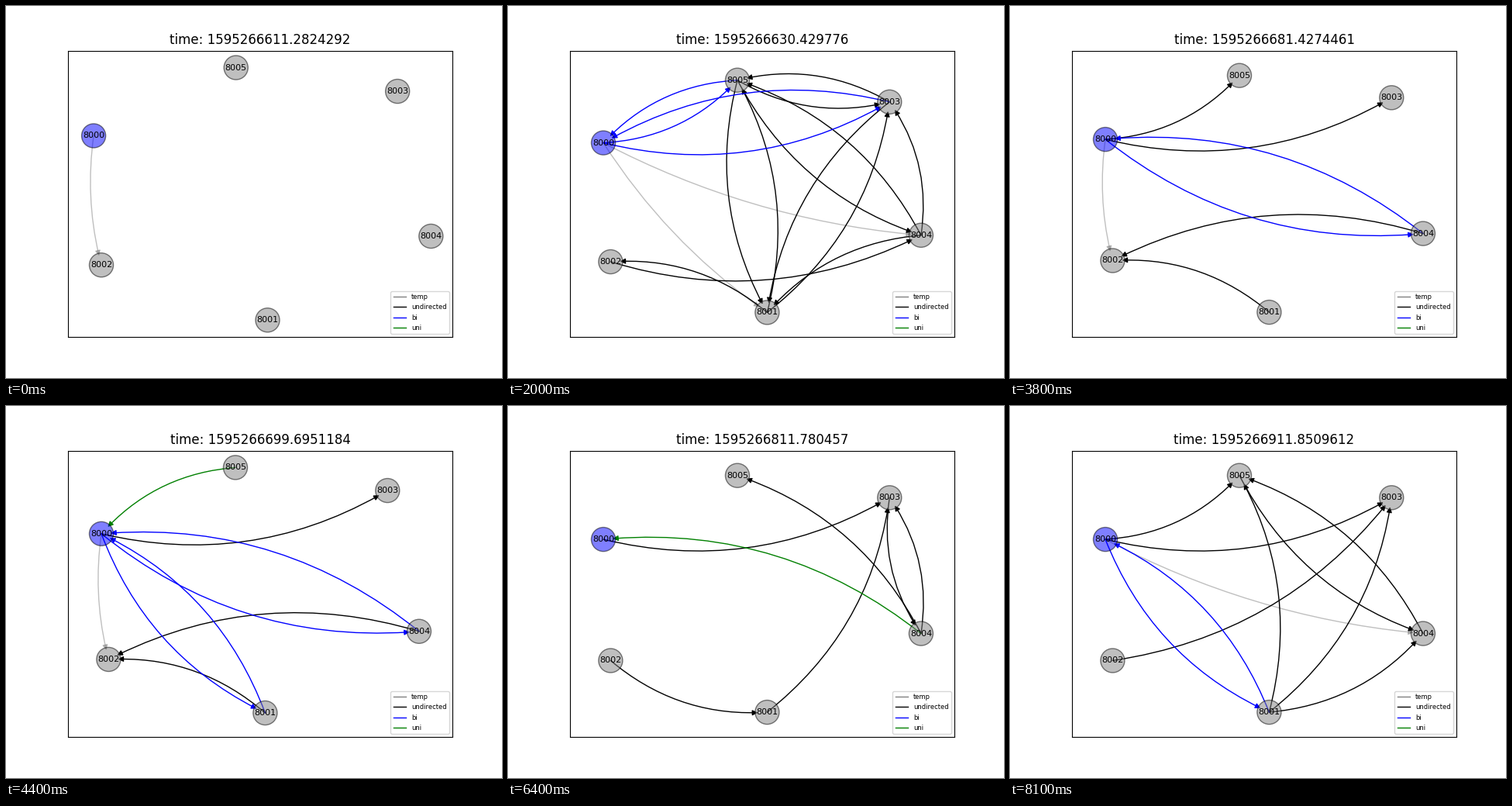
Animation, 640 px wide and 480 px high, one loop 8.2 s. Source, as a matplotlib script:

```python
import math
import random

import matplotlib.pyplot as plt
import numpy as np
from matplotlib.animation import FuncAnimation
from matplotlib.lines import Line2D
from matplotlib.patches import FancyArrowPatch

FRAMES, INTERVAL = 82, 100
NODE_SIZE, TIP_GAP = 500, math.sqrt(300) / 2
MARKER_PAD = 4.8   # room the markers take beyond the outer nodes
SKEW = 1.008       # aspect correction for the curve control points

NODES = np.array([(123.04, 307.9), (334.4, 84.87), (132.4, 151.5),
                  (492.3, 361.7), (532.96, 186.4), (296.0, 390.33)])

# kind: (colour, curvature, alpha)
KINDS = {
    "temp": ("grey", 0.1, 0.5),
    "undirected": ("black", 0.2, None),
    "bi": ("blue", 0.2, None),
    "uni": ("green", 0.2, None),
}

# frame: (clock, links by kind); "05" is a link from node 0 to node 5
STATES = {
    0: (1595266611.2824292, {"temp": "02"}),
    20: (1595266630.429776, {"undirected": "35 53 51 15 54 45 31 13 43 41 12 24",
                             "bi": "50 05 30 03", "temp": "04 01"}),
    30: (1595266657.07055, {"undirected": "05 03 51 15 54 31 13 12 24"}),
    44: (1595266699.6951184, {"undirected": "03 42 12", "bi": "04 40 01 10",
                              "uni": "50", "temp": "02"}),
    56: (1595266762.0957768, {"undirected": "05 03 04 21"}),
    72: (1595266861.4651375, {"undirected": "45 34 43 13 14", "bi": "30 03",
                              "uni": "40"}),
    81: (1595266911.8509612, {"undirected": "05 03 23 15 13 14 54 45",
                              "bi": "01 10", "temp": "04"}),
}
KEYS = list(STATES)
CLOCKS = [STATES[k][0] for k in KEYS]


def pair_of(link):
    return "".join(sorted(link))


def links_at_key(key):
    return {link: kind for kind, text in STATES[key][1].items()
            for link in text.split()}


def links_at(frame):
    """Links between two states: each node pair switches at its own moment."""
    if frame in STATES:
        return links_at_key(frame)
    start = max(k for k in KEYS if k < frame)
    end = min(k for k in KEYS if k > frame)
    old, new = links_at_key(start), links_at_key(end)
    rng = random.Random(start)
    pairs = sorted({pair_of(link) for link in [*old, *new]})
    switch = {p: rng.randint(start + 1, min(end, start + 10)) for p in pairs}
    links = {l: k for l, k in old.items() if frame < switch[pair_of(l)]}
    links.update({l: k for l, k in new.items() if frame >= switch[pair_of(l)]})
    return links


def ends(link):
    return NODES[int(link[0])], NODES[int(link[1])]


def control_point(link, rad):
    a, b = ends(link)
    dx, dy = b - a
    control = (a + b) / 2 + rad * np.array([dy / SKEW, -dx * SKEW])
    return a + (1 - 13 / math.hypot(dx, dy)) * (control - a)


def view_limits(links):
    points = [NODES.min(axis=0) - MARKER_PAD, NODES.max(axis=0) + MARKER_PAD]
    for kind, (_, rad, _) in KINDS.items():
        group = [link for link in links if links[link] == kind]
        if not group:
            continue
        tips = np.array([p for link in group for p in ends(link)])
        low, high = tips.min(axis=0), tips.max(axis=0)
        pad = 0.05 * (high - low)
        points += [low - pad, high + pad]
        points += [control_point(link, rad) for link in group]
    low, high = np.min(points, axis=0), np.max(points, axis=0)
    margin = 0.05 * (high - low)
    return low - margin, high + margin


fig, ax = plt.subplots(figsize=(6.4, 4.8), dpi=100)
fig.subplots_adjust(left=0.125, right=0.9, bottom=0.11, top=0.88)


def draw(frame):
    ax.clear()
    links = links_at(frame)
    low, high = view_limits(links)
    ax.set(xlim=(low[0], high[0]), ylim=(low[1], high[1]), xticks=[], yticks=[])

    for kind, (color, rad, alpha) in KINDS.items():
        for link in links:
            if links[link] == kind:
                a, b = ends(link)
                ax.add_patch(FancyArrowPatch(
                    a, b, arrowstyle="-|>", mutation_scale=10, color=color,
                    alpha=alpha, lw=1, shrinkA=0, shrinkB=TIP_GAP,
                    connectionstyle=f"arc3,rad={rad}", zorder=1))

    ax.scatter(*NODES.T, s=NODE_SIZE, c=["blue"] + ["grey"] * 5, alpha=0.5,
               edgecolors="black", linewidths=1, zorder=2)
    for i, (x, y) in enumerate(NODES):
        ax.text(x, y, str(8000 + i), size=8, ha="center", va="center")

    ax.set_xlim(low[0], high[0])
    ax.set_ylim(low[1], high[1])
    handles = [Line2D([], [], color=c, lw=1, label=kind)
               for kind, (c, _, _) in KINDS.items()]
    ax.legend(handles=handles, loc="lower right", prop={"size": 6})
    ax.set_title(f"time: {float(np.interp(frame, KEYS, CLOCKS))}")


anim = FuncAnimation(fig, draw, frames=FRAMES, interval=INTERVAL,
                     repeat=True, repeat_delay=0)
plt.show()
```
